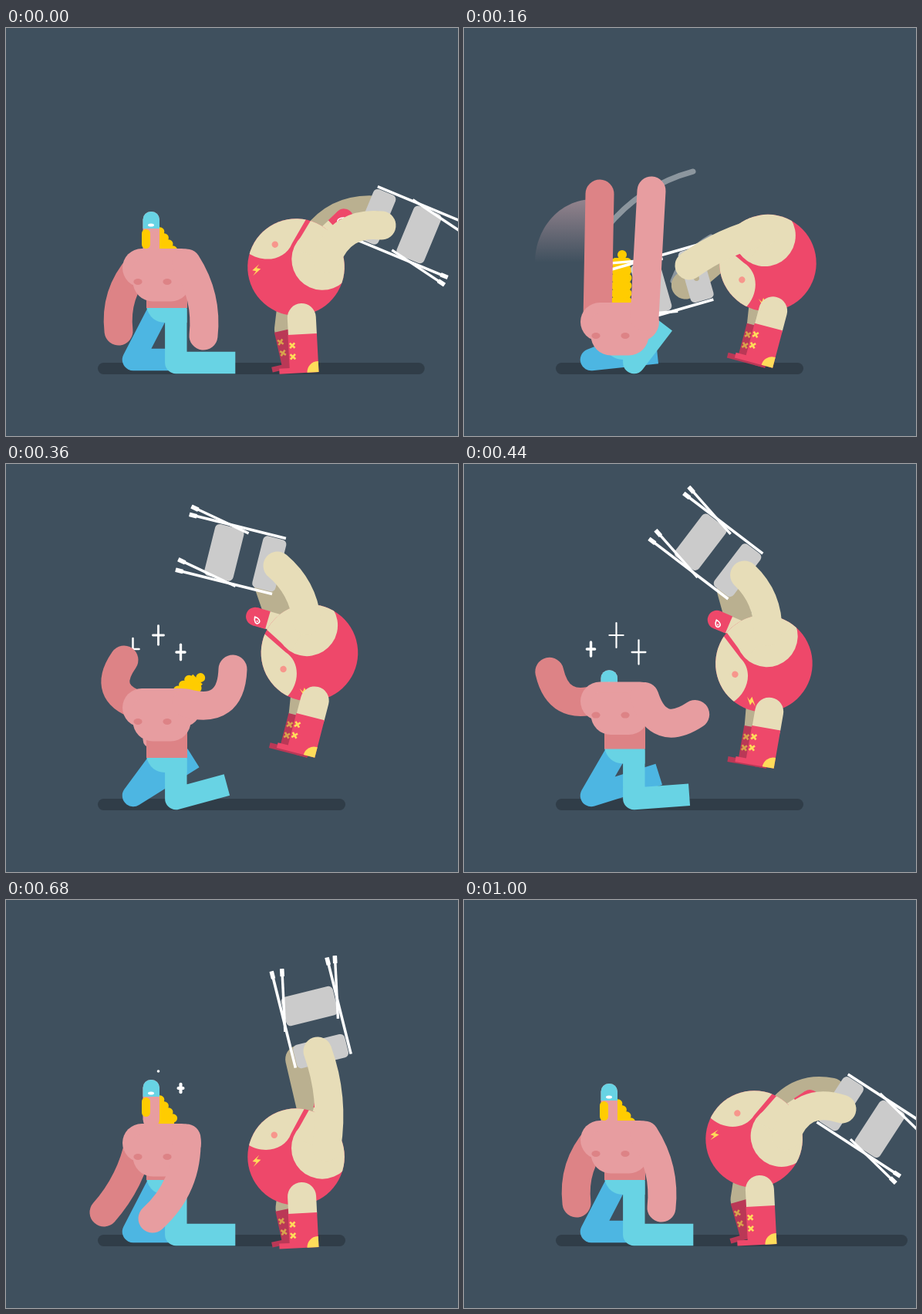
Recreate the animation shown at these times as an HTML page with a canvas. Size 586 by 529 pixels, loop 1040 ms.

```html
<!DOCTYPE html>
<html lang="en">
<head>
<meta charset="utf-8">
<title>Wrestlers</title>
<style>
html, body { margin: 0; width: 100%; height: 100%; overflow: hidden; background: #3f505e; }
canvas { display: block; }
</style>
</head>
<body>
<canvas id="stage" width="586" height="529"></canvas>
<script>
const c = document.getElementById('stage').getContext('2d');
const LOOP = 1040, STEP = 40, RAD = Math.PI / 180;
const BG = '#3f505e', BAR = '#303d48', PINK = '#e79da0', ROSE = '#dd8386',
  CYAN = '#68d3e4', BLUE = '#4db6e2', YELLOW = '#ffcc00', RED = '#ee486a',
  WINE = '#ba3856', CREAM = '#e7ddb8', SAND = '#bab090', GRAY = '#cbcbcb',
  LEMON = '#ffdc5a', MUSTARD = '#d8a34c', WHITE = '#fff', TRAIL = '#8c969e';

// Key poses; every row starts with its time
const CROUCH = [ // torso, hip and head drop, tilt of the back shin
  [80, 0, 0, 2, 0], [160, 70, 48, 125, 6], [360, 5, 18, 70, 32],
  [520, -7, 0, 3, 2], [680, 4, 0, -3, 0], [840, 0, 0, 2, 0]];
const FISTS = [ // back fist and bend, front fist and bend
  [0, 146, 393, 20, 256, 399, -17], [160, 176, 215, 0, 243, 211, 0],
  [360, 153, 254, -42, 294, 266, 47], [520, 76, 290, -33, 302, 380, 42],
  [680, 127, 405, -14, 190, 413, -26], [840, 159, 410, 11, 251, 401, -17],
  [1000, 146, 393, 20, 256, 399, -17]];
const SWAY = [ // trunk turn, head nod
  [0, 47, 0], [80, 14, -40], [160, -33, -77], [360, -32, -42],
  [520, 0, -51], [680, 45, -32], [840, 55, -25], [1000, 57, 0]];
const SWING = [ // hand, chair turn, grip on the chair
  [0, 487, 256, 112.5, 7.5, 40], [80, 410, 168, 4, 4, 48],
  [160, 292, 308, -106, 14, 46], [360, 352, 132, -76, 0, 62],
  [520, 374, 164, -31, 1, 62], [680, 404, 196, -14, -4, 50],
  [840, 493, 244, 23, 3, 53], [1000, 490, 271, 123, 5, 46]];

// Monotone cubic through the rows, closed over the loop
function at(rows, t) {
  const n = rows.length;
  const row = i => rows[(i + n) % n];
  const time = i => row(i)[0] + Math.floor(i / n) * LOOP;
  let k = n - 1;
  while (k >= 0 && rows[k][0] > t) k--;
  const h = time(k + 1) - time(k), u = (t - time(k)) / h, w = u * u * (3 - 2 * u);
  return rows[0].slice(1).map((_, j) => {
    const val = i => row(i)[j + 1];
    const slope = i => (val(i + 1) - val(i)) / (time(i + 1) - time(i));
    const tangent = i => {
      const a = slope(i - 1), b = slope(i);
      return a * b <= 0 ? 0 : 2 * a * b / (a + b);
    };
    return val(k) * (1 - w) + val(k + 1) * w +
      h * u * (1 - u) * ((1 - u) * tangent(k) - u * tangent(k + 1));
  });
}

// Sine-shaped rise and fall, 0 outside from..to, 1 at the peak
function swell(t, from, peak, to) {
  if (t + LOOP < to) t += LOOP;
  const u = t < peak ? (t - from) / (peak - from) : (to - t) / (to - peak);
  return u <= 0 ? 0 : Math.sin(u * Math.PI / 2);
}

function disc(x, y, rx, color, ry = rx) {
  c.fillStyle = color;
  c.beginPath();
  c.ellipse(x, y, rx, ry, 0, 0, 7);
  c.fill();
}

function box(x, y, w, h, r, color) {
  c.fillStyle = color;
  c.beginPath();
  c.roundRect(x, y, w, h, r);
  c.fill();
}

function poly(p, color) {
  c.fillStyle = color;
  c.beginPath();
  for (let i = 0; i < p.length; i += 2) c.lineTo(p[i], p[i + 1]);
  c.fill();
}

function line(p, width, color, cap = 'butt') {
  c.strokeStyle = color;
  c.lineWidth = width;
  c.lineCap = cap;
  c.lineJoin = 'round';
  c.beginPath();
  for (let i = 0; i < p.length; i += 2) c.lineTo(p[i], p[i + 1]);
  c.stroke();
}

// Round-ended curve whose middle is pushed sideways by bend
function limb(x0, y0, x1, y1, bend, width, color) {
  const dx = x1 - x0, dy = y1 - y0, k = bend / (Math.hypot(dx, dy) || 1);
  c.strokeStyle = color;
  c.lineWidth = width;
  c.lineCap = 'round';
  c.beginPath();
  c.moveTo(x0, y0);
  c.quadraticCurveTo((x0 + x1) / 2 - dy * k, (y0 + y1) / 2 + dx * k, x1, y1);
  c.stroke();
}

function placed(x, y, deg, draw) {
  c.save();
  c.translate(x, y);
  c.rotate(deg * RAD);
  draw();
  c.restore();
}

// Point (x, y) of a frame turned by deg around (ox, oy)
function turn(x, y, deg, ox = 0, oy = 0) {
  const s = Math.sin(deg * RAD), k = Math.cos(deg * RAD);
  return [ox + x * k - y * s, oy + x * s + y * k];
}

function trails(t) {
  if (t < 120 || t > 200) return;
  c.globalAlpha = t > 160 ? 0.5 : 1;
  const g = c.createLinearGradient(0, 222, 0, 304);
  g.addColorStop(0, 'rgba(152,134,144,.95)');
  g.addColorStop(1, 'rgba(152,134,144,0)');
  c.fillStyle = g;
  c.beginPath();
  c.moveTo(168, 304);
  c.lineTo(92, 304);
  c.bezierCurveTo(92, 262, 122, 222, 168, 222);
  c.fill();
  limb(184, 260, 297, 186, -22, 7, TRAIL);
  limb(271, 328, 320, 271, -14, 7, TRAIL);
  c.globalAlpha = 1;
}

function star(x, y, size) {
  if (size <= 0) return;
  if (size < 3) return disc(x, y, 1.8, WHITE);
  const width = 2 + Math.max(0, 17 - size) * 0.18;
  line([x, y - size, x, y + size], width, WHITE, 'round');
  line([x - size * 0.57, y, x + size * 0.57, y], width, WHITE, 'round');
}

function stars(t) {
  star(164.5, 240, 15 * swell(t, 240, 310, 530));
  star(197.5, 222, 16 * swell(t, 260, 440, 690));
  star(226.5, 244, 17 * swell(t, 270, 500, 725));
}

// Curls thrown up out of the collar
function flyingHair(t, top) {
  const len = 66 * swell(t, 110, 160, 440);
  if (len < 8) return;
  const age = t - 160;
  placed(204 + age * 0.12, 294 + top, age * 0.23, () => {
    box(-9, -len, 18, len, 0, YELLOW);
    for (let s = 0; s <= len; s += 10) {
      disc(-7.5, -s, 6, YELLOW);
      disc(7.5, -s, 6, YELLOW);
    }
    disc(1, -len - 4, 6, YELLOW);
  });
}

function manHead(y) {
  c.save();
  c.translate(0, y);
  poly([190, 258, 201, 258, 218, 285, 218, 294, 190, 294], YELLOW);
  for (let i = 0; i < 4; i++) disc(199.5 + i * 5.6, 262 + i * 8, 5.8, YELLOW);
  box(177.5, 236, 21.5, 62, 10.5, PINK);
  box(177.5, 236, 21.5, 22, [10.5, 10.5, 0, 0], CYAN);
  box(176, 259, 11, 25, 5.5, YELLOW);
  disc(188, 253.5, 4, WHITE, 2);
  c.restore();
}

function manBody(t, [top, hip, , tilt]) {
  const [bx, by, bend, fx, fy, frontBend] = at(FISTS, t);
  const back = turn(65 + Math.min(27, tilt * 3.5), 0, -tilt, 165, 430);
  const front = turn(77 - 2 * Math.sqrt(hip), 0, -0.4 * hip ** 1.26, 220.3, 434);
  line([196, 370 + hip, 165, 430, ...back], 28.5, BLUE);
  c.fillStyle = CYAN;
  c.beginPath();
  c.moveTo(182, 362 + hip);
  c.lineTo(234.5, 362 + hip);
  c.lineTo(234.5, 382 + hip);
  c.lineTo(206, 382 + hip);
  c.quadraticCurveTo(187, 381 + hip, 182, 362 + hip);
  c.fill();
  line([220.3, 364 + hip, 220.3, 434, ...front], 28.4, CYAN);
  box(182, 330 + top, 53, Math.max(0, 33 + hip - top), 0, ROSE);
  limb(173, 308 + top, bx, by, bend, 37, ROSE);
  c.save();
  c.translate(0, top);
  box(151, 286, 102, 50, 25, PINK);
  box(164.5, 300, 75, 54.5, [10, 10, 26, 26], PINK);
  c.restore();
  limb(234, 305 + top, fx, fy, frontBend, 37, PINK);
  disc(171, 329 + top, 5.6, ROSE, 4);
  disc(209, 329 + top, 5.6, ROSE, 4);
}

function drawChair(x, y, deg) {
  placed(x, y, deg, () => {
    box(-34.5, -28.5, 69, 38.5, 6, GRAY);
    c.fillStyle = GRAY;
    c.beginPath();
    c.roundRect(-34.5, 35.5, 69, 31, 6);
    c.roundRect(-8, 47, 16, 7, 3.5);
    c.fill('evenodd');
    for (const x of [-37, 37]) {
      const strut = x * 0.955 - 1.5;
      line([x, -62, x, 64], 3.6, WHITE);
      line([strut + 13.3, -62, strut - 2, 15.5], 3.4, WHITE);
      box(x - 2.8, -65, 5.6, 10, 0.5, WHITE);
      placed(strut + 12.8, -60, 11, () => box(-2.8, -5, 5.6, 10, 0.5, WHITE));
    }
  });
}

function cross(x, y, color) {
  line([x - 3.2, y - 3.2, x + 3.2, y + 3.2], 2.6, color);
  line([x - 3.2, y + 3.2, x + 3.2, y - 3.2], 2.6, color);
}

function leg(x, y, deg, tall, hip, skin, boot, mark, heel) {
  line([...turn(-18.5, -tall, deg, x, y), ...hip], 37, skin, 'round');
  placed(x, y, deg, () => {
    poly([0, 0, 0, -tall, -37.5, -tall, -37.5, -7, -51, -7, -51, 0], boot);
    c.fillStyle = heel;
    c.beginPath();
    c.moveTo(0, 0);
    c.lineTo(-15, 0);
    c.arc(-1, 0, 14, Math.PI, Math.PI * 1.5);
    c.lineTo(0, -14);
    c.fill();
    cross(-32.5, -tall + 14, mark);
    cross(-32.5, -tall + 28.5, mark);
  });
}

function wrestlerHead(bx, by, sway, nod) {
  const neck = turn(-4, -43, sway, bx, by);
  placed(...neck, sway + nod, () => {
    line([0, 0, 0, -40], 23, CREAM);
    line([0, -29, 0, -46], 24, RED);
    disc(0, -46, 12, RED);
  });
  const face = turn(0, -46, sway + nod, ...neck);
  placed(...turn(-1, 5, sway, ...face), sway, () => {
    c.strokeStyle = WHITE;
    c.lineWidth = 1.6;
    c.beginPath();
    c.moveTo(0.5, -5);
    c.bezierCurveTo(4, -1, 4, 4.5, 0, 4.5);
    c.bezierCurveTo(-4, 4.5, -3.5, -1, 0.5, -5);
    c.stroke();
    disc(0, 1.5, 1, WHITE);
  });
}

function trunk(x, y, deg) {
  placed(x, y, deg, () => {
    c.save();
    c.beginPath();
    c.arc(0, 0, 62.8, 0, 7);
    c.clip();
    c.fillStyle = RED;
    c.fillRect(-70, -70, 140, 140);
    c.fillStyle = CREAM;
    c.beginPath();
    c.moveTo(-75, 36);
    c.lineTo(-56, 33);
    c.bezierCurveTo(-32, 28, -16, 4, -26, -17);
    c.lineTo(-39, -60);
    c.lineTo(-75, -60);
    c.fill();
    disc(16, -32, 40, CREAM);
    poly([-32, -58, -19.5, -14, 16, -32, 16, -70], CREAM);
    c.restore();
    disc(-40, 0, 4.2, '#f7968c');
    placed(-33, 40, -47, () => poly([4, -7, -5, 1, 0, 2, -4, 8, 6, -1, 0.5, -2], LEMON));
  });
}

function wrestler(t) {
  const [sway, nod] = at(SWAY, t);
  const [hx, hy, tip, gx, gy] = at(SWING, t);
  const squash = swell(t, 550, 680, 900), hop = swell(t, 170, 360, 550);

  // The turn of the trunk sets how far the legs lean and spread
  const lean = (sway - 50) ** 2 / 385;
  const spread = 13 * (Math.max(0, sway) / 57) ** 1.5;
  const heelX = 405.5 - lean * 0.3, heelY = 446 - lean * 0.3 - 60 * hop + 4 * squash;
  const tall = 50 - 5 * squash, tilt = lean - 3;
  const x = 376 + lean, y = heelY - 136 + 19 * squash;

  const bend = 18 - (tip + 45) ** 2 / 500;
  const near = turn(19, -37, sway, x, y), far = turn(-12, -46, sway, x, y);
  const farHand = turn(26, 0, 165 + 0.6 * tip, hx, hy);

  limb(...far, ...farHand, Math.min(0, bend) * 0.6, 36, SAND);
  drawChair(...turn(-gx, -gy, tip, hx, hy), tip);
  leg(heelX - 10, heelY - 1.1 * spread, tilt - spread, tall, [x, y], SAND, WINE, MUSTARD, WINE);
  wrestlerHead(x, y, sway, nod);
  trunk(x, y, sway);
  const hip = turn(-18.5, -tall - 21.5, tilt, heelX, heelY);
  leg(heelX, heelY, tilt, tall, hip, CREAM, RED, LEMON, LEMON);
  limb(...near, hx, hy, bend, 37, CREAM);
}

function render(t) {
  const crouch = at(CROUCH, t);
  c.fillStyle = BG;
  c.fillRect(0, 0, 586, 529);
  box(119, 434, 321 + 135 * swell(t, 680, 1000, 1089), 15, 7.5, BAR);
  trails(t);
  stars(t);
  flyingHair(t, crouch[0]);
  manHead(crouch[2]);
  wrestler(t);
  manBody(t, crouch);
}

function tick() {
  const now = performance.now() + 1;
  render(Math.floor(now % LOOP / STEP) * STEP);
  requestAnimationFrame(tick);
}
tick();
</script>
</body>
</html>
```
